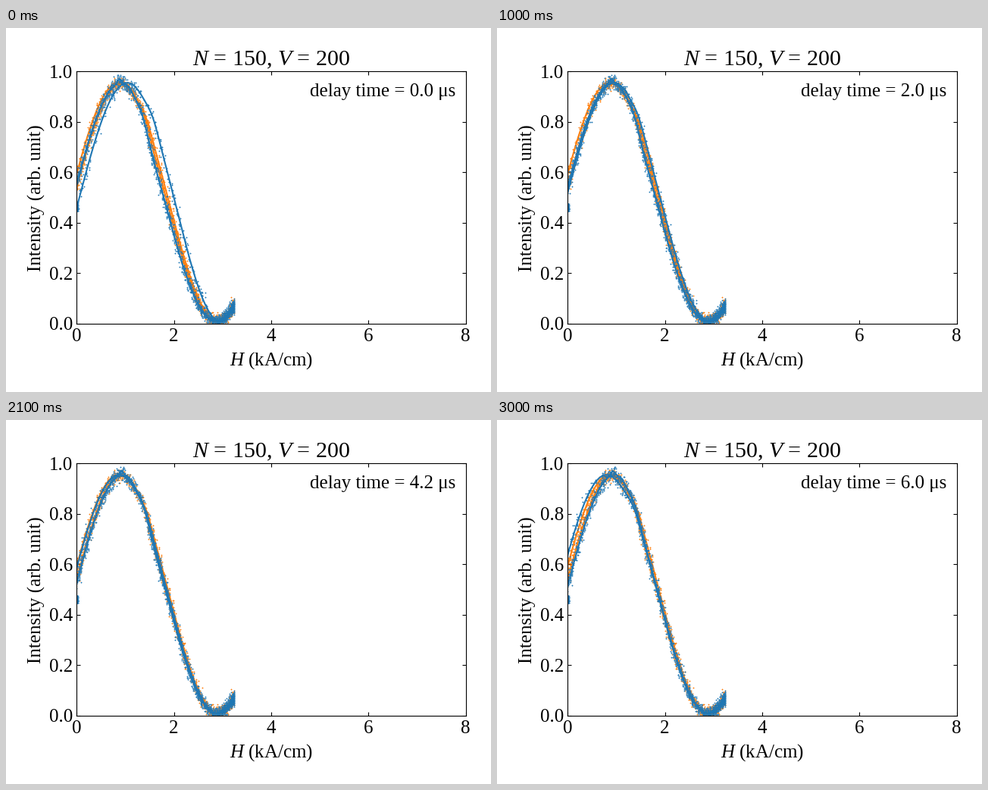
Write a matplotlib script that moves like this. It is 640 by 480 pixels and loops after 3100 ms.

```python
import numpy as np
import matplotlib.pyplot as plt
from matplotlib.animation import FuncAnimation

plt.rcParams.update({
    "font.family": "Liberation Serif",
    "font.size": 18,
    "mathtext.fontset": "custom",
    "mathtext.rm": "Liberation Serif",
    "mathtext.it": "Liberation Serif:italic",
    "xtick.direction": "in",
    "ytick.direction": "in",
    "xtick.top": True,
    "ytick.right": True,
    "xtick.major.pad": 4.2,
})

FRAMES, INTERVAL = 31, 100
STEP = 0.2  # microseconds of delay per frame
H_MAX = 3.24
BLUE, ORANGE = "tab:blue", "tab:orange"
rng = np.random.default_rng(4)


def response(h):
    """Intensity without any lag."""
    wave = 0.01 + 0.945 * np.cos(np.pi / 2 * (h - 0.87) / 2.03) ** 2
    return wave + 0.02 * np.exp(-((h - 1.42) / 0.15) ** 2)


def smooth(h, a, b):
    u = np.clip((h - a) / (b - a), 0, 1)
    return u * u * (3 - 2 * u)


def branch(h, left, right):
    """Response shifted by left at low field and by right at high field."""
    shift = left + (right - left) * smooth(h, 0.85, 1.6)
    return response(h - shift * (1 - (h / H_MAX) ** 4))


def falling(h, delay):
    left = 0.045 + 0.009 * delay
    bump = 0.016 * np.exp(-((h - 0.88 - 0.008 * delay) / 0.05) ** 2)
    return branch(h, left, left - 0.125) + bump


def rising(h, delay):
    left = 0.175 - 0.041 * delay
    right = -0.06 + 0.22 * np.exp(-0.36 * delay)
    return branch(h, left, right)


def orange_fall(h):
    return branch(h, 0.065, -0.03)


def orange_rise(h):
    return branch(h, -0.01, 0.015)


def quantize(v, q):
    return np.round(v / q) * q


class Cloud:
    """Measured points with fixed noise around one branch."""

    def __init__(self, n):
        # more samples where the field turns round
        self.h = H_MAX * np.sin(np.pi / 2 * rng.random(n)) ** 1.1
        self.dh = rng.normal(0, 0.026, n)
        self.di = rng.normal(0, 0.011, n)

    def points(self, curve):
        x = np.clip(self.h + self.dh, 0, H_MAX)
        y = np.abs(curve(self.h) + self.di)
        return quantize(x, 0.0156), quantize(y, 0.0058)


fig = plt.figure(figsize=(6.4, 4.8), dpi=100)
ax = fig.add_axes([93.3 / 640, 90 / 480, 513.3 / 640, 332.7 / 480])
ax.set(xlim=(0, 8), ylim=(0, 1), xticks=range(0, 9, 2),
       yticks=np.arange(6) / 5)
ax.set_title("$N$ = 150, $V$ = 200")
ax.set_xlabel("$H$ (kA/cm)", labelpad=5.4)
ax.set_ylabel("Intensity (arb. unit)")

h = np.linspace(0, H_MAX, 300)
dots = dict(ls="", marker="+", ms=1.9, mew=0.6)

for curve, n in ((orange_fall, 1300), (orange_rise, 450)):
    ax.plot(*Cloud(n).points(curve), color=ORANGE, **dots)
for curve in (orange_fall, orange_rise):
    ax.plot(h, curve(h), color=ORANGE, lw=1.5)

# samples taken before the pulse
rest_h = quantize(np.abs(rng.normal(0, 0.02, 45)), 0.0156)
rest_i = quantize(rng.uniform(0.445, 0.475, 45), 0.0058)
ax.plot(rest_h, rest_i, color=BLUE, **dots)

parts = []
for curve, n in ((falling, 1500), (rising, 400)):
    marks, = ax.plot([], [], color=BLUE, **dots)
    line, = ax.plot([], [], color=BLUE, lw=1.5)
    parts.append((curve, Cloud(n), marks, line))

label = ax.text(593.5, 480 - 90, "", ha="right", va="baseline",
                transform=None)


def update(i):
    delay = STEP * i
    for curve, cloud, marks, line in parts:
        marks.set_data(*cloud.points(lambda x: curve(x, delay)))
        line.set_data(h, curve(h, delay))
    label.set_text(f"delay time = {delay:.1f} μs")
    return [label]


anim = FuncAnimation(fig, update, frames=FRAMES, interval=INTERVAL,
                     repeat=True, repeat_delay=0)
plt.show()
```
